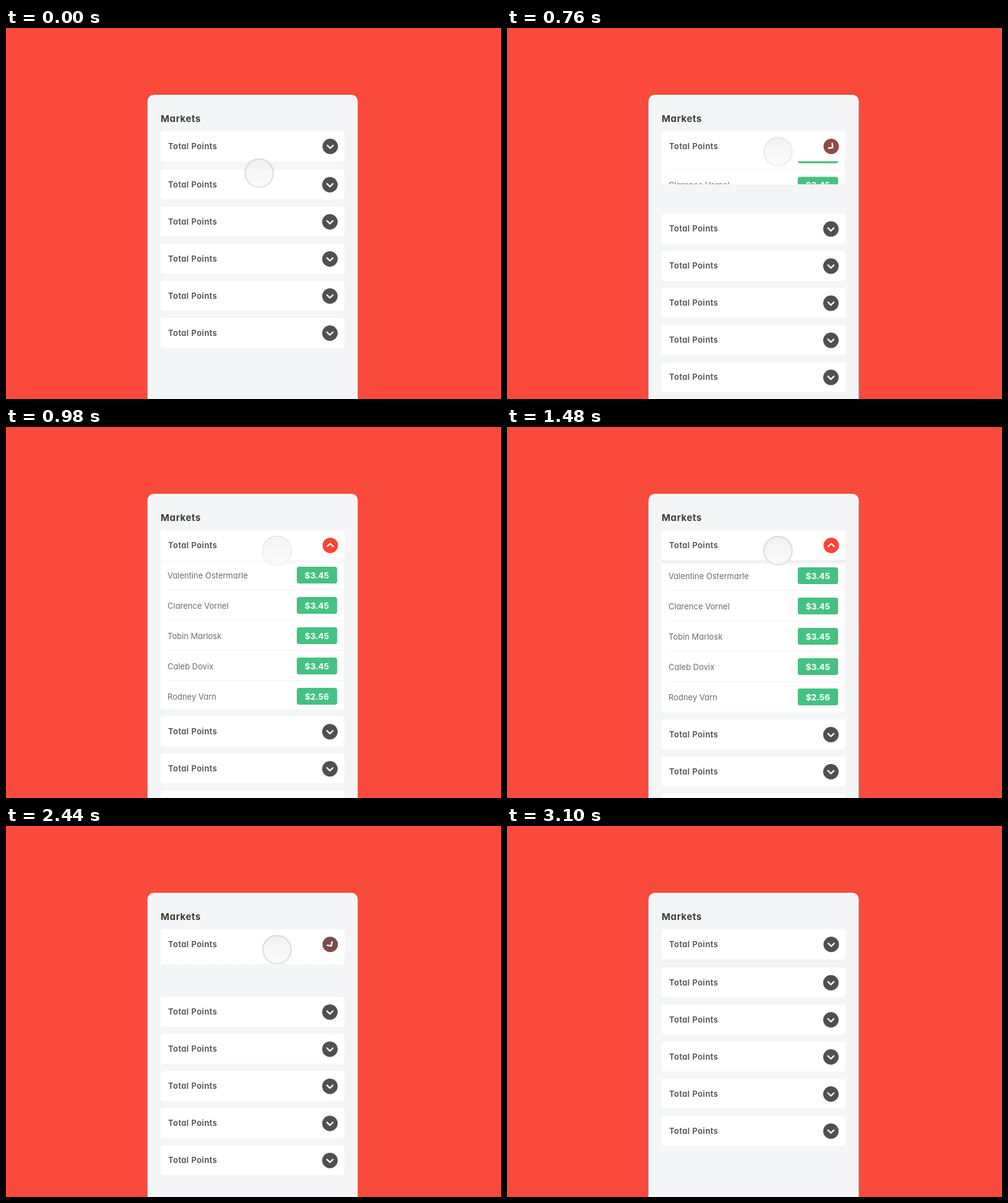
An HTML page for the animation above (4140 ms loop, 800x600 px).

```html
<!DOCTYPE html>
<html lang="en">
<head>
<meta charset="utf-8">
<title>Markets accordion</title>
<style>
  html, body { margin: 0; width: 100%; height: 100%; overflow: hidden; background: #f94a3b; }
  svg { display: block; width: 800px; height: 600px; }
  text { font-family: Inter, "Open Sans", sans-serif; font-feature-settings: "cv11"; }
  .title { font-size: 15px; font-weight: 700; letter-spacing: .6px; fill: #3c3c34; }
  .label { font-size: 13px; font-weight: 600; letter-spacing: .45px; fill: #4c4c4c; }
  .name { font-size: 13px; fill: #6c6c6c; }
  .price { font-size: 13.5px; font-weight: 700; fill: #fff; text-anchor: middle; }
  .chevron { fill: none; stroke: #fff; stroke-width: 2.4; stroke-linecap: round; stroke-linejoin: round; }
</style>
</head>
<body>
<svg viewBox="0 0 800 600">
  <defs>
    <clipPath id="reveal"><rect id="mask" x="250" y="167" width="296.5"/></clipPath>
    <linearGradient id="shade" x2="0" y2="1">
      <stop stop-color="#000" stop-opacity=".09"/>
      <stop offset="1" stop-color="#000" stop-opacity="0"/>
    </linearGradient>
    <linearGradient id="glass" x2="0" y2="1">
      <stop stop-color="#f0f0f0"/>
      <stop offset="1" stop-color="#fafafa"/>
    </linearGradient>
  </defs>
  <rect width="800" height="600" fill="#f94a3b"/>
  <rect x="228.2" y="110" width="340.8" height="520" rx="10" fill="#a0807c" opacity=".8"/>
  <rect x="228.7" y="108" width="339.7" height="520" rx="10" fill="#f4f5f7"/>
  <text class="title" x="250" y="152">Markets</text>
  <g id="rows"></g>
  <g clip-path="url(#reveal)">
    <g id="list"></g>
    <rect id="shadow" x="250" y="215.5" width="296.5" height="8" fill="url(#shade)"/>
  </g>
  <g id="head"></g>
  <g id="cursor">
    <circle id="disc" fill="url(#glass)"/>
    <circle id="ring" fill="none" stroke="#000" stroke-width="2.4"/>
  </g>
</svg>
<script>
const LOOP = 4140;
const $ = id => document.getElementById(id);
const set = (id, attrs) => {
  for (const k in attrs) $(id).setAttribute(k, attrs[k]);
};
const clamp = v => Math.max(0, Math.min(1, v));
const ramp = (t, from, to) => clamp((t - from) / (to - from));
const mix = (a, b, k) => a + (b - a) * k;

// Cubic bezier (.4, 0, .2, 1), solved by bisection
function ease(x) {
  let lo = 0, hi = 1;
  for (let i = 0; i < 24; i++) {
    const s = (lo + hi) / 2, r = 1 - s;
    if (1.2 * s * r * r + .6 * s * s * r + s * s * s < x) lo = s; else hi = s;
  }
  return lo * lo * (3 - 2 * lo);
}

const bar = (y, h, iconX, id = '') => `
  <rect x="250" y="${y}" width="296.5" height="${h}" rx="4" fill="#fff"/>
  <text class="label" x="262" y="${y + 28.5}">Total Points</text>
  <g transform="translate(${iconX} ${y + 24.5})">
    <circle ${id && `id="${id}Dot"`} r="12.5" fill="#505050"/>
    <path ${id && `id="${id}Arrow"`} class="chevron" d="M-4.7-1.6 L0 3 L4.7-1.6"/>
  </g>`;

const runners = [
  ['Valentine Ostermarle', '$3.45'],
  ['Clarence Vornel', '$3.45'],
  ['Tobin Marlosk', '$3.45'],
  ['Caleb Dovix', '$3.45'],
  ['Rodney Varn', '$2.56']
];

$('head').innerHTML = bar(167, 48.5, 524, 'head');
$('rows').innerHTML = [0, 1, 2, 3, 4].map(i => bar(229 + 60 * i, 48, 523.5)).join('');
$('list').innerHTML = '<rect x="250" y="167" width="296.5" height="293.5" rx="4" fill="#fff"/>' +
  runners.map(([name, price], i) => {
    const y = 240.5 + 49 * i;
    const line = i < 4 ? `<rect x="262" y="${y + 23.5}" width="284" height="1" fill="#f0f0f1"/>` : '';
    return `<text class="name" x="261" y="${y + 5.3}">${name}</text>
      <rect x="470.5" y="${y - 13}" width="64" height="26" rx="2.5" fill="#45c283" stroke="#40ba7c"/>
      <text class="price" x="502.5" y="${y + 5.3}">${price}</text>${line}`;
  }).join('');

function drawAccordion(t) {
  const closing = t > 1500;
  const open = closing ? 1 - ease(ramp(t, 2222.5, 2638.5)) : ease(ramp(t, 652, 1052));
  const heat = clamp(open * 1.25);
  const [r, g, b] = [[80, 255], [80, 67], [80, 53]].map(c => Math.round(mix(...c, heat)));
  set('rows', { transform: `translate(0 ${244 * open})` });
  set('list', { transform: `translate(0 ${-50 * (1 - open)})` });
  set('mask', { height: Math.max(0, 296 * open - 1) });
  set('shadow', { opacity: closing ? open : ramp(t, 860, 1200) });
  set('headDot', { fill: `rgb(${r},${g},${b})` });
  set('headArrow', { transform: `rotate(${-180 * open})` });
}

function drawCursor(t) {
  const arrive = 1 - (1 - ramp(t, 0, 350)) ** 3;
  const leave = ramp(t, 2960, 3080) ** 2;
  const x = mix(409, 438, arrive) + 243 * leave;
  const y = mix(235, 200, arrive) - 163 * leave;
  const pulse = ramp(t, 670, 850) * (1 - ramp(t, 880, 1150));
  const rest = t >= 480 ? mix(22.8, 24, ramp(t, 670, 850)) : 24;
  const radius = rest + pulse;
  set('cursor', { transform: `translate(${x} ${y})`, visibility: t < 3100 ? 'visible' : 'hidden' });
  set('disc', { r: radius, opacity: .9 - .2 * pulse });
  set('ring', { r: radius - 1.2, opacity: .09 * (1 - pulse) });
}

function frame(now) {
  const t = now % LOOP;
  drawAccordion(t);
  drawCursor(t);
  requestAnimationFrame(frame);
}
frame(0);
</script>
</body>
</html>
```
